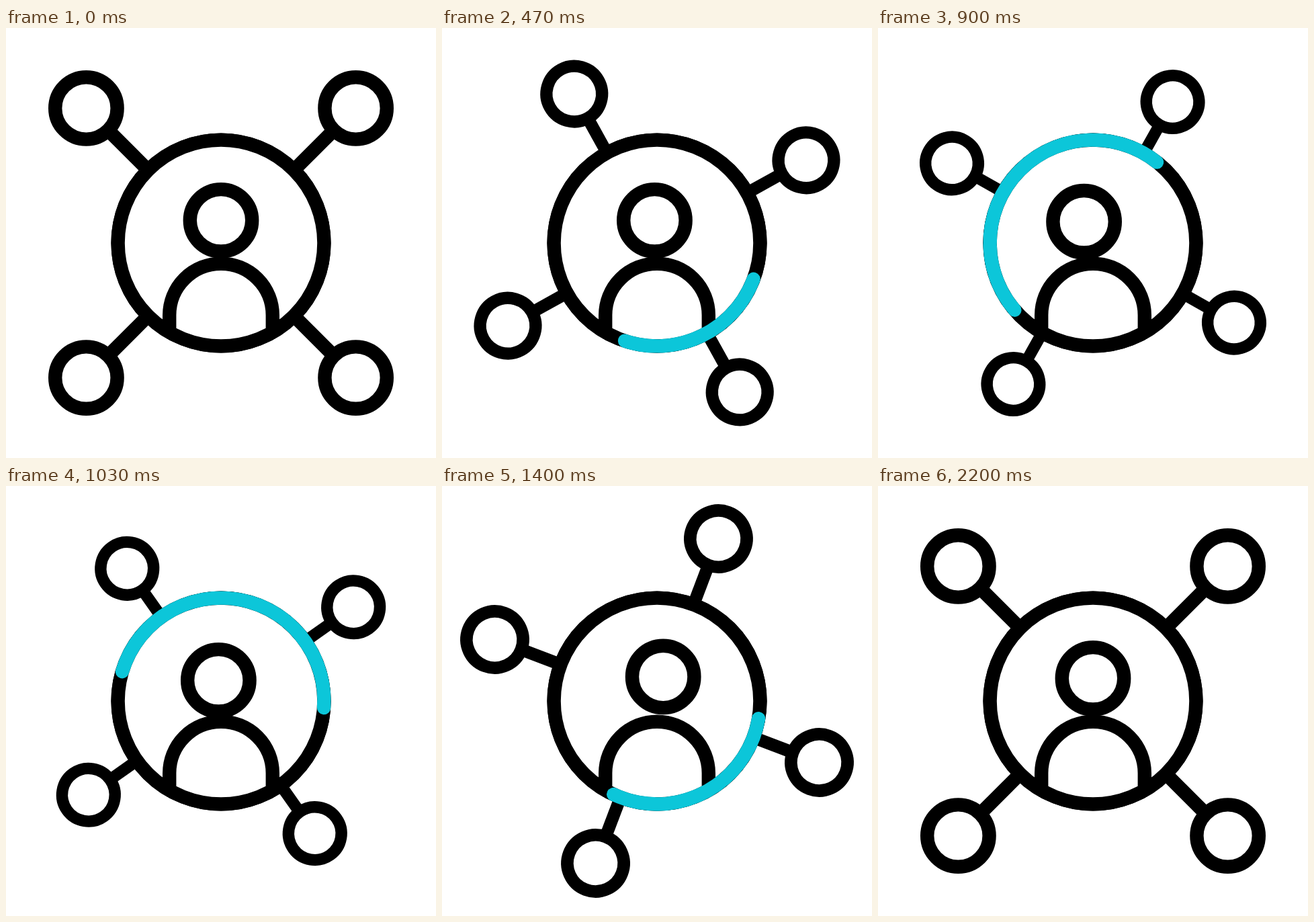
Animation of 640 by 640 pixels, one loop 2.27 s. Source, as an HTML page with a canvas:

```html
<!DOCTYPE html>
<html lang="en">
<head>
<meta charset="utf-8">
<title>Network</title>
<style>
  html, body { margin: 0; height: 100%; overflow: hidden; background: #fff; }
  canvas { display: block; width: 640px; height: 640px; }
</style>
</head>
<body>
<canvas id="stage" width="640" height="640"></canvas>
<script>
const ctx = document.getElementById('stage').getContext('2d');
const LOOP = 2270, END = 1970, RAD = Math.PI / 180;
const BLACK = '#000', TEAL = '#0cc6d9', LINE = 20.4, RADIUS = 153.4;

// Progress from 0 to 1 along cubic-bezier(a, 0, c, 1)
function ease(t, from, to, a = 0.33, c = 0.67) {
  const x = Math.min(1, Math.max(0, (t - from) / (to - from)));
  let lo = 0, hi = 1, s;
  for (let i = 0; i < 24; i++) {
    s = (lo + hi) / 2;
    const r = 1 - s;
    if (3 * a * s * r * r + 3 * c * s * s * r + s * s * s < x) lo = s; else hi = s;
  }
  return s * s * (3 - 2 * s);
}

function ring(x, y, r, from = 0, to = 360) {
  ctx.beginPath();
  ctx.arc(x, y, r, from * RAD, to * RAD);
  ctx.stroke();
}

function drawNodes(t) {
  const scale = 1 - 0.15 * (ease(t, 0, 785, 0.53, 0.47) - ease(t, 930, END, 0.53, 0.47));
  ctx.save();
  ctx.rotate((45 + 180 * ease(t, 0, END, 0.53, 0.465)) * RAD);
  ctx.scale(scale, scale);
  for (let i = 0; i < 4; i++) {
    ctx.beginPath();
    ctx.moveTo(154 / scale, 0);
    ctx.lineTo(238, 0);
    ctx.stroke();
    ring(283.7, 0, 46.2);
    ctx.rotate(90 * RAD);
  }
  ctx.restore();
}

function drawPerson(t) {
  ctx.beginPath();
  ctx.moveTo(-76.8, 132);
  ctx.arc(0, 107.5, 76.8, Math.PI, 0);
  ctx.lineTo(76.8, 132);
  ctx.stroke();
  // The head sways left, dips on its way right, then settles
  const x = -16.5 * ease(t, 330, 800) + 29 * ease(t, 800, 1300) - 12.5 * ease(t, 1300, 1600);
  const y = 3 * ease(t, 720, 1020) - 5.6 * ease(t, 1020, 1360) + 2.6 * ease(t, 1360, 1600);
  ring(x, y - 33.7, 46.2);
}

function drawArc(t) {
  const tail = 20.5 + 476.5 * ease(t, 500, 1738, 0.23, 0.87);
  const tip = 20.5 + 476.5 * ease(t, 132, 1636, 0.25, 0.59);
  if (tip - tail < 0.3) return;
  ctx.lineCap = 'round';
  ctx.strokeStyle = TEAL;
  ring(0, 0, RADIUS, tail, tip);
}

function draw(t) {
  ctx.setTransform(1, 0, 0, 1, 0, 0);
  ctx.fillStyle = '#fff';
  ctx.fillRect(0, 0, 640, 640);
  ctx.translate(320, 320);
  ctx.lineWidth = LINE;
  ctx.lineCap = 'butt';
  ctx.strokeStyle = BLACK;

  drawNodes(t);
  ring(0, 0, RADIUS);
  ctx.fill();
  drawPerson(t);
  ring(0, 0, RADIUS);
  drawArc(t);
}

const start = performance.now();
function frame() {
  draw((performance.now() - start) % LOOP);
  requestAnimationFrame(frame);
}
frame();
</script>
</body>
</html>
```
